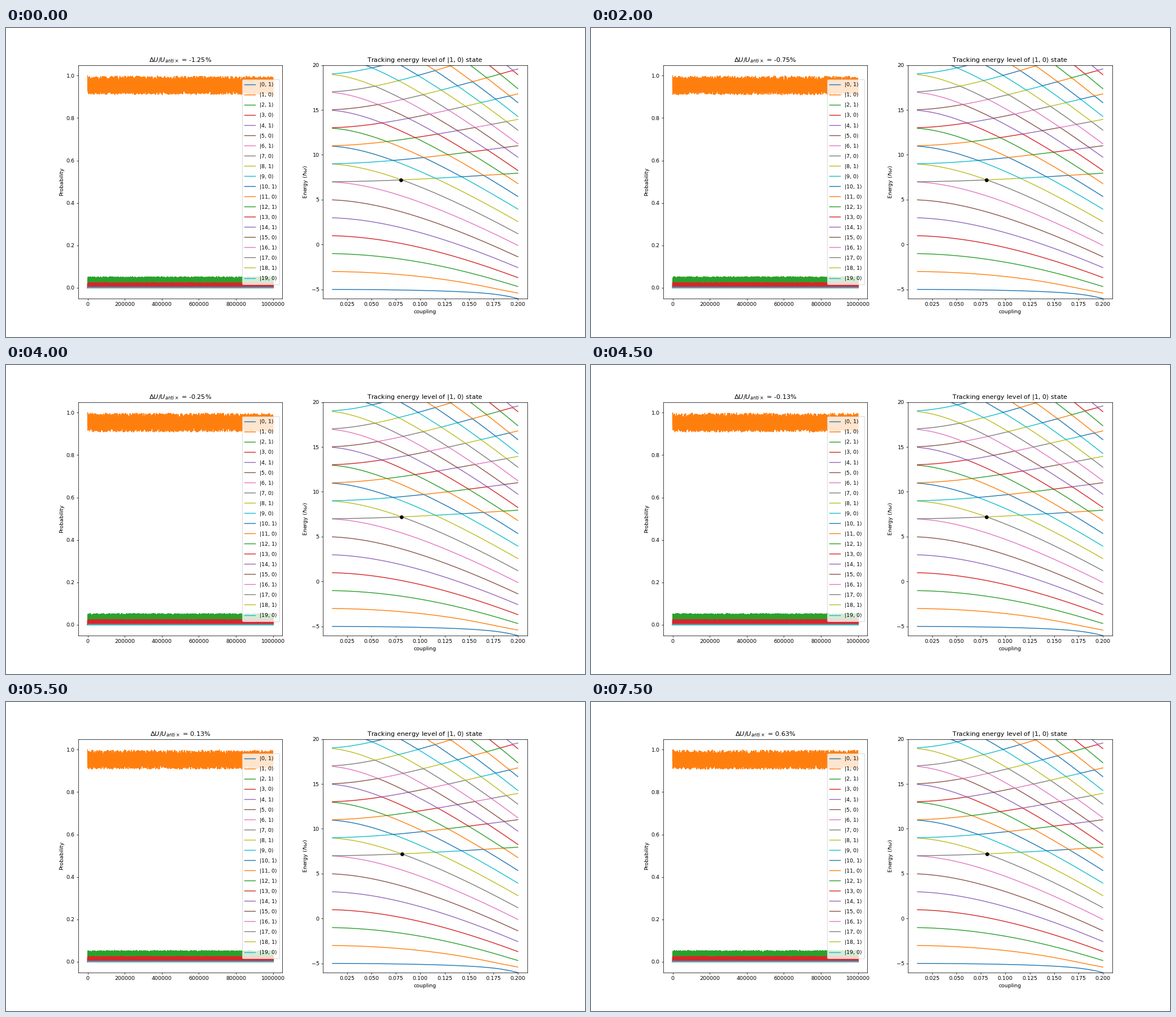
Animation, 1025 px wide and 547 px high, one loop 8000 ms. Source, as a matplotlib script:

```python
import numpy as np
import matplotlib.pyplot as plt
from matplotlib.animation import FuncAnimation

plt.rcParams["font.family"] = "DejaVu Sans"

W, H = 1025, 547
DPI = W / 15          # the sheet is 15 inches wide
SPLIT = 11            # two-level splitting in units of the oscillator quantum
SIZE = 60             # length of the truncated parity chain
SHOWN = 20            # states with a probability curve
HALF_PERIOD = 565000  # time of full transfer at the anticrossing
SAMPLES = 10000
FRAMES, INTERVAL = 16, 500

n = np.arange(SIZE)
diagonal = n + 0.5 + np.where(n % 2, SPLIT / 2, -SPLIT / 2)
ladder = np.sqrt(n[1:])


def hamiltonian(u):
    off = SPLIT * u * ladder
    return np.diag(diagonal) + np.diag(off, 1) + np.diag(off, -1)


def gap(u):
    e = np.linalg.eigvalsh(hamiltonian(u))
    return e[8] - e[7]


def find_anticrossing(lo=0.077, hi=0.085):
    for _ in range(62):
        a, b = lo + (hi - lo) / 3, hi - (hi - lo) / 3
        if gap(a) < gap(b):
            hi = b
        else:
            lo = a
    return (lo + hi) / 2


def probabilities(u):
    e, v = np.linalg.eigh(hamiltonian(u))
    phase = np.exp(-1j * np.outer(e - e[7], times * time_scale))
    amp = (v[:SHOWN] * v[1]) @ phase
    return np.abs(amp) ** 2, e[7]


def ket(k):
    return rf"|{k}, {1 - k % 2}$\rangle$"


u_cross = find_anticrossing()
time_scale = np.pi / (HALF_PERIOD * gap(u_cross))

# Jittered samples keep the fast oscillation free of moire beats
jitter = np.random.default_rng(1).random(SAMPLES)
times = (np.arange(SAMPLES) + jitter) * 1e6 / SAMPLES
times[0], times[-1] = 0, 1e6

offsets = -1.25 + 0.125 * np.arange(FRAMES)   # percent
couplings = u_cross * (1 + offsets / 100)
states = [probabilities(u) for u in couplings]

fig, (left, right) = plt.subplots(
    1, 2, figsize=((W + 0.01) / DPI, (H + 0.01) / DPI), dpi=DPI, facecolor="white")
fig.subplots_adjust(left=0.125, right=0.9, bottom=0.125, top=0.88, wspace=0.2)

# Probabilities over time
curves = [left.plot(times, p, label=ket(k))[0]
          for k, p in enumerate(states[0][0])]
left.set(xlim=(-5e4, 1.05e6), ylim=(-0.05, 1.05), ylabel="Probability")
left.ticklabel_format(style="plain", axis="x")
heading = left.set_title("")


def add_legend(spacing):
    return left.legend(loc="center right", labelspacing=spacing, framealpha=0.8)


# Row spacing that gives the box its height of 363 px
legend = add_legend(0.5)
fig.canvas.draw()
extra = 363 - legend.get_window_extent().height
add_legend(0.5 + extra / (SHOWN - 1) / (10 * DPI / 72))

# Energy levels against coupling
grid = np.linspace(0.01, 0.2, 100)
levels = np.array([np.linalg.eigvalsh(hamiltonian(u)) for u in grid])
right.plot(grid, levels[:, :40])
dot, = right.plot([couplings[0]], [states[0][1]], "ko")
right.set(xlim=(0.0005, 0.2095), ylim=(-6, 20), xlabel="coupling",
          ylabel=r"Energy ($\hbar\omega$)",
          title=f"Tracking energy level of {ket(1)} state")


def update(i):
    probs, energy = states[i]
    for curve, p in zip(curves, probs):
        curve.set_ydata(p)
    dot.set_data([couplings[i]], [energy])
    percent = offsets[i] * (1 + 1e-9)   # halves round away from zero
    heading.set_text(rf"$\Delta U/U_{{anti\times}}$ = {percent:.2f}%")
    return [*curves, dot, heading]


anim = FuncAnimation(fig, update, frames=FRAMES, interval=INTERVAL,
                     init_func=lambda: update(0), repeat=True, repeat_delay=0)
plt.show()
```
